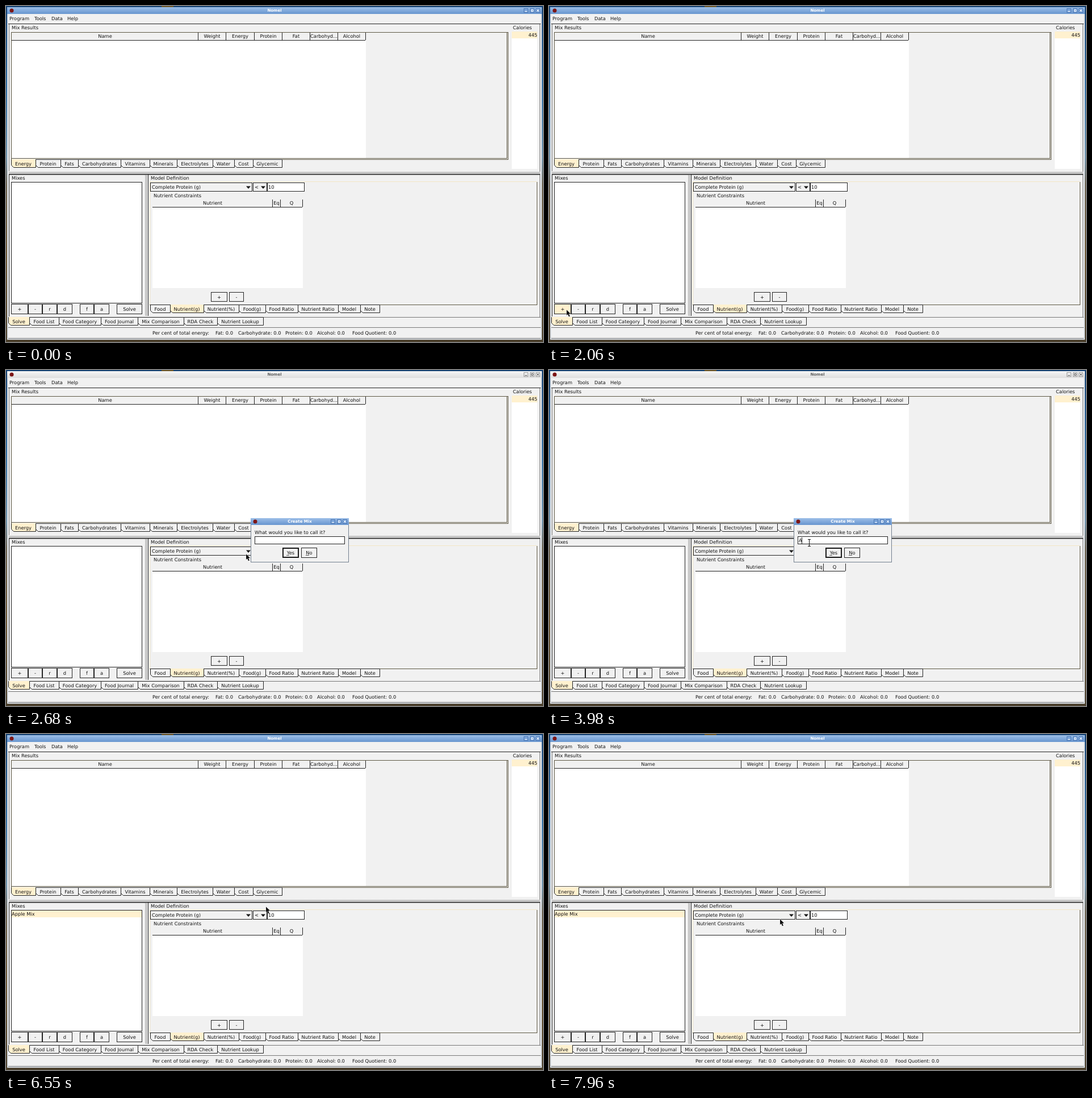
Recreate the animation shown at these times as an HTML page with a canvas. Size 946 by 592 pixels, loop 8000 ms.

```html
<!DOCTYPE html>
<html lang="en">
<head>
<meta charset="utf-8">
<title>Nomel</title>
<style>
  html, body { margin: 0; width: 100%; height: 100%; overflow: hidden; }
  canvas { display: block; }
</style>
</head>
<body>
<canvas id="stage" width="946" height="592"></canvas>
<script>
const ctx = document.getElementById('stage').getContext('2d');
const LOOP = 8000, STEP = 40;
const APP = 'Nomel';
const INK = '#111', PANEL = '#f1f1f1', CREAM = '#fff1cf', WHITE = '#fff';
const EDGE = '#242424', OLIVE = '#5e5844', GREY = '#777';

// Pointer runs: time, x, y of the tip at a few points; hidden before and between runs
const RUNS = [
  { until: 580, keys: [[500, 938, 485], [540, 886, 561]] },
  { until: 1350, keys: [[910, 688, 588], [1070, 530, 588], [1190, 379, 583], [1270, 150, 565], [1310, 2, 547]] },
  { until: 2360, keys: [[1610, 3, 537], [1730, 20, 535], [1870, 23, 535], [2060, 31, 535]] },
  { until: 7320, keys: [[2360, 60, 522], [2520, 270, 412], [2680, 423, 324], [2760, 451, 305], [2840, 458, 302], [2920, 458, 304]] },
  { until: LOOP, keys: [[7320, 460, 305], [7480, 456, 317], [7680, 435, 332], [7840, 412, 330], [7960, 407, 326]] }
];
const KEYSTROKES = [3980, 4440, 4550, 4770, 4870, 5190, 5580, 5980, 6160];
const MIX = 'Apple Mix';

function fill(color, x, y, w, h) {
  ctx.fillStyle = color;
  ctx.fillRect(x, y, w, h);
}

function box(x, y, right, bottom, color = PANEL, border = EDGE) {
  fill(border, x, y, right - x, bottom - y);
  fill(color, x + 1, y + 1, right - x - 2, bottom - y - 2);
}

// y is the middle of the capitals; baselines sit on whole pixels
function text(str, x, y, align = 'left', color = INK, font = '8.3px "DejaVu Sans", sans-serif') {
  ctx.textRendering = 'geometricPrecision';
  ctx.font = font;
  ctx.textAlign = align;
  ctx.fillStyle = color;
  ctx.fillText(str, x, Math.round(y + 3));
}

function polygon(points, color, stroke) {
  ctx.beginPath();
  points.forEach(([x, y]) => ctx.lineTo(x, y));
  ctx.closePath();
  ctx.fillStyle = color;
  ctx.fill();
  if (stroke) {
    ctx.strokeStyle = stroke;
    ctx.lineWidth = 1;
    ctx.stroke();
  }
}

function button(label, x, y, right, bottom, color) {
  box(x, y, right, bottom, color);
  text(label, (x + right) / 2, (y + bottom) / 2, 'center');
}

function tabs(y, height, selected, left, items) {
  items.forEach(([label, right], i) => {
    const l = left + .5, r = right + .5, b = y + height - .5;
    polygon([[l, y - .5], [r, y - .5], [r, b], [l + 4, b], [l, b - 4]],
      i === selected ? CREAM : PANEL, EDGE);
    if (i === selected) fill(CREAM, left + 1, y - 1, right - left - 1, 1);
    text(label, (left + right) / 2, y + height / 2, 'center');
    left = right;
  });
}

function header(y, bottom, edges, labels) {
  fill(PANEL, edges[0], y, edges.at(-1) - edges[0], bottom - y);
  fill(EDGE, edges[0], bottom, edges.at(-1) - edges[0], 1);
  labels.forEach((label, i) => {
    fill(EDGE, edges[i + 1], y, 1, bottom - y);
    text(label, (edges[i] + edges[i + 1]) / 2 + .5, Math.floor((y + bottom) / 2), 'center');
  });
}

function hatch(x, y, w, h) {
  fill('#f4f4f4', x, y, w, h);
  ctx.fillStyle = '#999';
  for (let j = 0; j < h; j++)
    for (let i = j % 2; i < w; i += 2) ctx.fillRect(x + i, y + j, 1, 1);
}

function titleBar(label, x, y, w, h, active) {
  const shade = ctx.createLinearGradient(0, y, 0, y + h);
  shade.addColorStop(0, active ? '#9dbfe8' : '#f6f6f6');
  shade.addColorStop(1, active ? '#6795cf' : '#dedede');
  fill(shade, x, y, w, h);
  const cy = y + h / 2;
  ctx.beginPath();
  ctx.arc(x + 8, cy, 3.5, 0, 7);
  ctx.fillStyle = '#7d1616';
  ctx.fill();
  text(label, x + w / 2, cy - .6, 'center', active ? WHITE : '#606060',
    'bold 7px "DejaVu Sans", sans-serif');
  const mark = active ? WHITE : '#555';
  for (let i = 0; i < 3; i++) {
    const bx = Math.round(x + w - 32 + i * 10.5), by = cy - 4;
    box(bx, by, bx + 8, by + 8, active ? '#7ba5da' : '#eee', active ? '#4d78b4' : '#999');
    ctx.strokeStyle = mark;
    ctx.lineWidth = 1;
    ctx.beginPath();
    if (i === 0) { ctx.moveTo(bx + 2, by + 5.5); ctx.lineTo(bx + 6, by + 5.5); }
    if (i === 1) ctx.rect(bx + 2.5, by + 2.5, 3, 3);
    if (i === 2) {
      ctx.moveTo(bx + 2, by + 2); ctx.lineTo(bx + 6, by + 6);
      ctx.moveTo(bx + 6, by + 2); ctx.lineTo(bx + 2, by + 6);
    }
    ctx.stroke();
  }
}

function desktop() {
  const sky = ctx.createLinearGradient(0, 0, 0, 592);
  [[0, '#123f70'], [.25, '#2f6ea5'], [.45, '#6d93ad'], [.53, '#6b6250'], [.75, '#6e5733'], [1, '#4a3f2c']]
    .forEach(([at, color]) => sky.addColorStop(at, color));
  fill(sky, 0, 0, 946, 592);
  fill('#6b5425', 274, 0, 21, 2);
}

function results() {
  text('Mix Results', 10, 38);
  box(9, 46, 885, 271, PANEL, OLIVE);
  fill(OLIVE, 882, 47, 1, 222);
  fill(OLIVE, 10, 268, 873, 1);
  fill(WHITE, 10, 60, 624, 208);
  header(47, 60, [10, 338, 387, 437, 486, 535, 584, 633],
    ['Name', 'Weight', 'Energy', 'Protein', 'Fat', 'Carbohyd...', 'Alcohol']);
  tabs(271, 14, 0, 9, [['Energy', 52], ['Protein', 96], ['Fats', 127], ['Carbohydrates', 202],
    ['Vitamins', 253], ['Minerals', 301], ['Electrolytes', 364], ['Water', 402], ['Cost', 435], ['Glycemic', 486]]);
  text('Calories', 893, 38);
  fill(WHITE, 891, 45, 45, 242);
  fill(CREAM, 891, 45, 45, 12);
  text('445', 936, 51, 'right');
}

function mixes(hasMix, hover) {
  text('Mixes', 10, 303);
  box(9, 310, 240, 524, WHITE);
  if (hasMix) {
    fill(CREAM, 10, 311, 229, 12);
    text(MIX, 10, 317);
  }
  [['+', 9, 39], ['-', 39, 64], ['r', 64, 90], ['d', 90, 117], ['f', 130, 155], ['a', 155, 182], ['Solve', 195, 240]]
    .forEach(([label, x, right], i) => button(label, x, 525, right, 543, hover && i === 0 ? CREAM : PANEL));
}

function combo(label, x, right) {
  box(x, 311, right, 327);
  text(label, x + 3, 319);
  polygon([[right - 11, 317.5], [right - 3, 317.5], [right - 7, 322]], INK);
}

function model() {
  text('Model Definition', 255, 303);
  fill('#f3e6c5', 253, 309, 682, 1);
  fill('#f3e6c5', 253, 309, 1, 217);
  fill(OLIVE, 935, 310, 1, 217);
  fill(OLIVE, 253, 526, 683, 1);
  combo('Complete Protein (g)', 254, 434);
  combo('<', 435, 460);
  box(460, 311, 526, 327, WHITE);
  text('10', 462, 319);
  text('Nutrient Constraints', 260, 334);
  fill(WHITE, 258, 354, 265, 143);
  header(341, 354, [258, 469, 483, 522], ['Nutrient', 'Eq', 'Q']);
  button('+', 361, 504, 390, 521);
  button('-', 393, 504, 419, 521);
  tabs(527, 14, 1, 254, [['Food', 289], ['Nutrient(g)', 348], ['Nutrient(%)', 410], ['Food(g)', 457],
    ['Food Ratio', 514], ['Nutrient Ratio', 585], ['Model', 624], ['Note', 658]]);
}

function mainWindow(active, hasMix, hover) {
  fill('#d8dde3', 2, 2, 942, 586);
  fill(PANEL, 4, 14, 938, 572);
  titleBar(APP, 2, 2, 942, 12, active);
  [['Program', 6], ['Tools', 50], ['Data', 80], ['Help', 108]].forEach(([label, x]) => text(label, x, 22));
  fill(EDGE, 4, 31, 938, 1);
  fill(GREY, 5, 32, 1, 259);
  fill(GREY, 940, 32, 1, 516);
  results();
  hatch(5, 292, 936, 4);
  fill(EDGE, 5, 296, 936, 1.5);
  fill(EDGE, 5, 297, 1, 250);
  hatch(245, 298, 4, 248);
  fill(EDGE, 250, 297, 1, 249);
  mixes(hasMix, hover);
  model();
  fill(GREY, 4, 548, 938, 1);
  tabs(549, 14, 0, 4, [['Solve', 41], ['Food List', 93], ['Food Category', 167], ['Food Journal', 232],
    ['Mix Comparison', 313], ['RDA Check', 372], ['Nutrient Lookup', 453]]);
  fill(GREY, 4, 566, 938, 1);
  [['Per cent of total energy:', 258], ['Fat: 0.0', 369], ['Carbohydrate: 0.0', 409], ['Protein: 0.0', 492],
    ['Alcohol: 0.0', 548], ['Food Quotient: 0.0', 610]].forEach(([label, x]) => text(label, x, 576));
  fill(GREY, 4, 585, 938, 1);
}

function dialog(t) {
  box(431, 261, 604, 339, PANEL, '#73808f');
  titleBar('Create Mix', 431, 261, 173, 12, true);
  text('What would you like to call it?', 438, 286);
  box(438, 293, 597, 307, WHITE);
  const typed = MIX.slice(0, KEYSTROKES.filter(at => t >= at).length);
  text(typed, 440, 300);
  if (t >= 3440) fill(INK, 440 + Math.floor(ctx.measureText(typed).width), 295, 1, 11);
  box(487, 313, 516, 331, PANEL, INK);
  button('Yes', 488, 314, 515, 330);
  button('No', 520, 313, 548, 331);
  fill(INK, 494, 326, 5, .7);
  fill(INK, 528, 326, 6, .7);
}

function pointerAt(t) {
  const run = RUNS.find(r => t >= r.keys[0][0] && t < r.until);
  if (!run) return null;
  const { keys } = run;
  const now = keys[0][0] + Math.floor((t - keys[0][0]) / STEP) * STEP;
  const next = keys.findIndex(k => k[0] > now);
  if (next < 0) return keys.at(-1).slice(1);
  const [a, b] = [keys[next - 1], keys[next]];
  const p = (now - a[0]) / (b[0] - a[0]);
  return [1, 2].map(i => Math.round(a[i] + (b[i] - a[i]) * p));
}

function pointer(t, dialogOpen) {
  const at = pointerAt(t);
  if (!at) return;
  const [x, y] = at;
  if (dialogOpen && x > 438 && y > 293 && y < 307) {
    fill(INK, x, y - 5, 1, 11);
    fill(INK, x - 2, y - 6, 5, 1);
    fill(INK, x - 2, y + 6, 5, 1);
    return;
  }
  const outline = [[0, 0], [0, 9.5], [2.2, 7.6], [4, 11.8], [5.8, 11], [4, 7], [7, 6.8]]
    .map(([dx, dy]) => [x + dx, y + dy + .5]);
  polygon(outline, INK, 'rgba(255,255,255,.8)');
  polygon(outline, INK);
}

function draw(t) {
  const dialogOpen = t >= 2210 && t < 6490;
  desktop();
  mainWindow(t < 2210 || t >= 6550, t >= 6490, t >= 1870 && t < 2360);
  if (dialogOpen) dialog(t);
  pointer(t, dialogOpen);
}

const start = performance.now();
function tick() {
  draw((performance.now() - start) % LOOP);
  requestAnimationFrame(tick);
}
tick();
</script>
</body>
</html>
```
